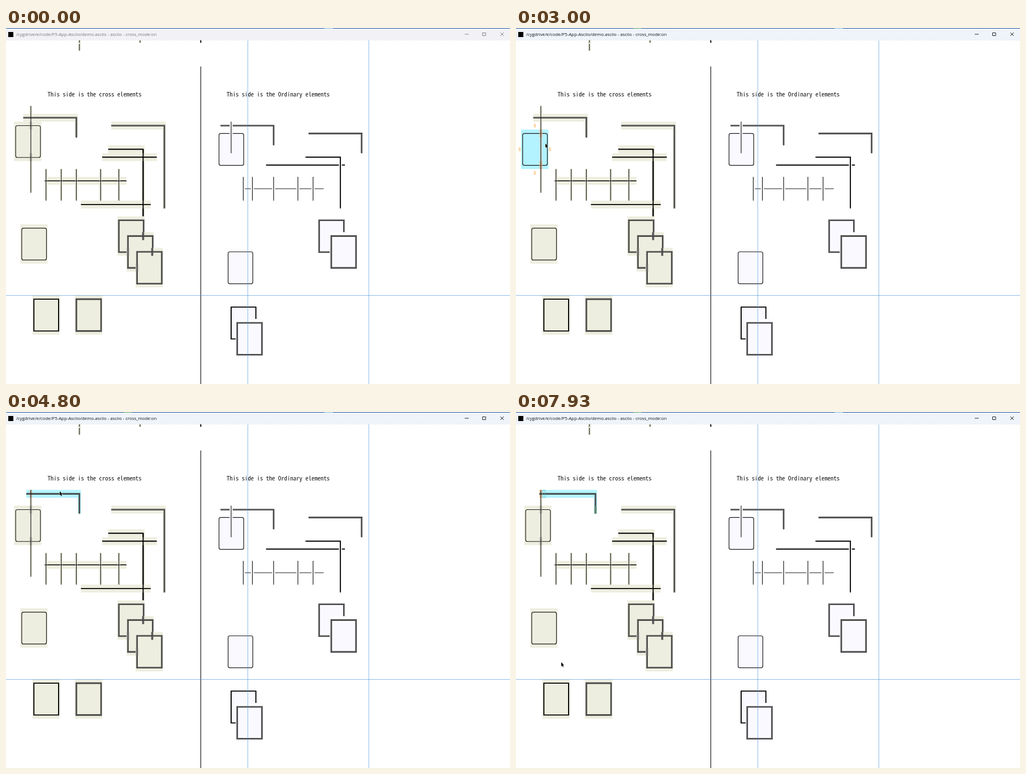
These frames come from a looping animation (891 by 629 pixels, 8000 ms). An HTML page with a canvas:

```html
<!DOCTYPE html>
<html lang="en">
<head>
<meta charset="utf-8">
<title>Cross mode</title>
<style>
html, body { margin: 0; width: 100%; height: 100%; overflow: hidden; background: #fff; }
canvas { display: block; }
</style>
</head>
<body>
<canvas id="stage" width="891" height="629"></canvas>
<script>
const ctx = document.getElementById('stage').getContext('2d');
const LOOP = 8000, FPS = 15;
const OLIVE = '#eeeee0', CYAN = '#b2f3ff', PALE = '#faf9ff';
const GREY = 'rgba(130,130,125,.3)', TAN = 'rgba(240,170,120,.5)', ORANGE = '#f5b04c';
const PENS = {
  thin: [[1.2, '#1c1c1c']],
  thick: [[1.9, '#000']],
  double: [[2.6, '#222'], [.7, '#999']]
};

// Everything on the page sits on a character grid; X and Y give cell centres
const CELL = 5.365, ROW = 13.94;
const X = c => c * CELL + 1;
const Y = r => r * ROW + 5.2;

// Monospace size whose advance equals one cell
const MONO = '"Noto Sans Mono CJK SC", "Noto Sans Mono CJK JP", "Noto Sans Mono", monospace';
ctx.font = '100px ' + MONO;
const monoFont = (100 * CELL / ctx.measureText('m').width).toFixed(2) + 'px ' + MONO;

// Pointer strokes: start, end, then points evenly spaced in time
const strokes = [
  [0, 130, 411, 198], [130, 930, 290, 232, 318, 214], [1000, 1730, 0, 222],
  [1730, 2000, 14, 262], [2000, 2600, 56, 211], [2600, 2670, 57, 196],
  [2670, 2870, 56, 216, 52, 236], [2870, 3000, 52, 204], [3000, 3200, 57, 196],
  [3530, 4000, 78, 134, 84, 159], [4000, 4270, 88, 157], [4270, 4330, 88, 145],
  [4330, 4800, 95, 140], [4800, 5130, 103, 141], [5730, 6130, 112, 192, 115, 169],
  [6270, 7070, 82, 300, 110, 450, 148, 500], [7330, 7930, 145, 508, 80, 442]
];

function pointerAt(t) {
  let x = 0, y = 0;
  for (const [from, to, ...points] of strokes) {
    const steps = points.length / 2;
    const progress = Math.max(0, (t - from) / (to - from) * steps);
    for (let i = 0; i < steps; i++) {
      const k = Math.min(1, Math.max(0, progress - i));
      x += (points[2 * i] - x) * k;
      y += (points[2 * i + 1] - y) * k;
    }
  }
  return [x, y];
}

// Whole cells an element has been dragged between press and release
function dragged(t, press, release) {
  const [x0, y0] = pointerAt(press);
  const [x, y] = pointerAt(Math.min(release, Math.max(press, t)));
  return [Math.round((x - x0) / CELL), Math.round((y - y0) / ROW)];
}

function fill(color, x, y, w, h) {
  ctx.fillStyle = color;
  ctx.fillRect(x, y, w, h);
}

const cells = (color, c, r, w = 1, h = 1) =>
  fill(color, X(c - .5), Y(r - .5), w * CELL, h * ROW);

function stroke(pen, path) {
  for (const [width, color] of PENS[pen]) {
    ctx.lineWidth = width;
    ctx.strokeStyle = color;
    ctx.beginPath();
    path();
    ctx.stroke();
  }
}

function across(pen, c1, c2, r, glow) {
  if (glow) cells(glow, c1, r, c2 - c1 + 1);
  stroke(pen, () => {
    ctx.moveTo(X(c1 - .5), Y(r));
    ctx.lineTo(X(c2 + .5), Y(r));
  });
}

function down(pen, c, r1, r2, glow) {
  if (glow) cells(glow, c, r1, 1, r2 - r1 + 1);
  stroke(pen, () => {
    ctx.moveTo(X(c), Y(r1 - .5));
    ctx.lineTo(X(c), Y(r2 + .5));
  });
}

function corner(pen, c1, c2, r1, r2, glow) {
  if (glow) {
    cells(glow, c1, r1, c2 - c1 + 1);
    cells(glow, c2, r1 + 1, 1, r2 - r1);
  }
  stroke(pen, () => {
    ctx.moveTo(X(c1 - .5), Y(r1));
    ctx.lineTo(X(c2), Y(r1));
    ctx.lineTo(X(c2), Y(r2 + .5));
  });
}

function box(pen, c, r, inner, margin) {
  const w = 8.15 * CELL, h = 4 * ROW + .5;
  if (margin) cells(margin, c, r, 9, 5);
  fill(inner, X(c), Y(r), w, h);
  stroke(pen, () => ctx.roundRect(X(c), Y(r), w, h, pen === 'thin' ? 3 : 0));
}

function outline(color, x, y, w, h) {
  ctx.strokeStyle = color;
  ctx.lineWidth = .8;
  ctx.strokeRect(x - w / 2, y - h / 2, w, h);
}

const handle = (c, r) => outline(ORANGE, X(c), Y(r), 2, 5);
const cellOutline = (color, c, r) => outline(color, X(c), Y(r), 4.8, 13);

// Connection handles around an element w cells wide and h rows high
function handles(c, r, w, h) {
  const midC = c + (w >> 1), midR = r + (h >> 1);
  handle(midC, r - 1);
  handle(midC, r + h);
  handle(c - 1, midR);
  handle(c + w, midR);
}

function text(str, x, y, font, color) {
  ctx.font = font;
  ctx.fillStyle = color;
  ctx.fillText(str, x, y);
}

function titleBar(focused) {
  const ink = focused ? '#111' : '#777';
  fill(focused ? '#eff3fa' : '#f2f2f6', 0, 0, 891, 21);
  fill('#2458a6', 0, 0, 891, 1);
  if (focused) fill('#58a860', 208, 0, 14, 1);
  fill('#8fb8e6', 563, 0, 15, 1);
  fill('#000', 4, 7, 9, 9);
  text('/cygdrive/e/code/P5-App-Asciio/demo.asciio - asciio - cross_mode:on',
    18, 14, '7.8px "Open Sans", sans-serif', ink);
  ctx.strokeStyle = ink;
  ctx.lineWidth = .9;
  ctx.beginPath();
  ctx.moveTo(811, 11); ctx.lineTo(818, 11);
  ctx.rect(842.5, 8.5, 5.5, 5);
  ctx.moveTo(874, 8); ctx.lineTo(880, 14);
  ctx.moveTo(880, 8); ctx.lineTo(874, 14);
  ctx.stroke();
  for (let x = 0; x < 891; x += 4) fill('#dfe3e8', x, 21, 2, 1);
}

function crossSide(t) {
  const boxOn = t >= 2670 && t < 4270, cornerOn = t >= 4270;
  const [bx, by] = dragged(t, 2670, 3200);
  const [cx, cy] = dragged(t, 4270, 5130);
  const bc = 3 + bx, br = 12 + by, cc = 6 + cx, cr = 11 + cy;
  const boxColor = boxOn ? CYAN : OLIVE;

  down('thin', 24, 0, 2, OLIVE);
  fill(OLIVE, X(23.5), 26, CELL, 2);
  down('thin', 44, 0, 1, OLIVE);

  cells(OLIVE, 8, 10, 1, 11);
  corner('double', cc, cc + 17, cr, cr + 2, cornerOn ? CYAN : OLIVE);
  box('thin', bc, br, boxColor, boxColor);
  if (boxOn) cells('rgba(255,190,150,.3)', 8, br, 1, 5);
  for (const r of [br, br + 4]) cells(boxOn ? TAN : GREY, 8, r);
  if (cornerOn) {
    cells(TAN, 8, cr);
    across('double', 8, 8, cr);
  }
  down('thin', 8, 10, 20);

  corner('double', 35, 52, 12, 22, OLIVE);
  corner('thick', 34, 45, 15, 23, OLIVE);
  across('thick', 32, 49, 16, OLIVE);
  across('thick', 25, 47, 22, OLIVE);
  down('thick', 45, 15.5, 23);

  across('thin', 13, 39, 19, OLIVE);
  for (const c of [13, 18, 23, 31, 37]) down('thin', c, 18, 21, OLIVE);
  across('thin', 13, 39, 19);

  box('thin', 5, 25, OLIVE, OLIVE);
  for (let i = 0; i < 3; i++) box('double', 37 + 3 * i, 24 + 2 * i, OLIVE, OLIVE);
  for (let i = 0; i < 2; i++) {
    const c = 40 + 3 * i, r = 26 + 2 * i;
    cells(GREY, c + 5, r);
    cells(GREY, c, r + 2);
    down('double', c + 5, r, r);
  }
  box('thick', 9, 34, OLIVE, OLIVE);
  box('double', 23, 34, OLIVE, OLIVE);

  if (boxOn) handles(bc, br, 9, 5);
  if (boxOn && t >= 3200) cellOutline('#a9b070', bc + 8, br + 4);
  if (t >= 4870 && t < 5060) handles(14, 8, 31, 1);
  if (t >= 5870) {
    cellOutline('#58bcc0', cc, cr);
    cells('rgba(120,170,130,.45)', cc + 17, cr + 2);
  }
}

function ordinarySide() {
  box('thin', 70, 13, PALE);
  corner('double', 71, 88, 12, 14);
  cells('#fff', 74, 12);
  cells(PALE, 74, 13);
  down('thin', 74, 12, 15);
  corner('double', 100, 117, 13, 15);
  corner('thick', 99, 110, 16, 22);
  across('thick', 86, 109, 17);
  across('thick', 111, 111, 17);

  across('thin', 79, 104, 20);
  for (const c of [78, 81, 88, 96, 101]) {
    cells('#fff', c, 20);
    down('thin', c, 19, 21);
  }
  box('double', 103, 24, PALE);
  box('double', 107, 26, PALE, '#fcfcff');
  box('thin', 73, 28, PALE);
  box('thick', 74, 35, PALE);
  box('double', 76, 37, PALE, '#fcfcff');
}

function drawPointer([x, y]) {
  ctx.save();
  ctx.translate(x, y);
  ctx.beginPath();
  for (const [px, py] of [[0, 0], [0, 7.4], [1.7, 5.9], [2.9, 8.8], [4.1, 8.3], [2.9, 5.5], [5, 5.4]])
    ctx.lineTo(px, py);
  ctx.closePath();
  ctx.strokeStyle = '#fff';
  ctx.lineWidth = .8;
  ctx.stroke();
  ctx.fillStyle = '#000';
  ctx.fill();
  ctx.restore();
}

function draw(t) {
  fill('#fff', 0, 0, 891, 629);
  down('thin', 64, 5, 45);
  down('thick', 64, 0, 1);
  crossSide(t);
  ordinarySide();
  text('This side is the cross elements', X(13.5), 121, monoFont, '#111');
  text('This side is the Ordinary elements', X(72.5), 121, monoFont, '#111');
  const guide = 'rgba(70,145,220,.6)';
  for (const x of [427, 641]) fill(guide, x, 22, 1, 607);
  fill(guide, 0, 472, 891, 1);
  titleBar(t >= 2000);
  const away = t < 130 || (t >= 1730 && t < 2000);
  if (!away) drawPointer(pointerAt(t));
}

let start;
function tick(now) {
  start ??= now;
  const t = (now - start) % LOOP;
  // The screen refreshes at a fixed rate
  draw(Math.floor((t + 4) * FPS / 1000) * 1000 / FPS);
  requestAnimationFrame(tick);
}
requestAnimationFrame(tick);
</script>
</body>
</html>
```
